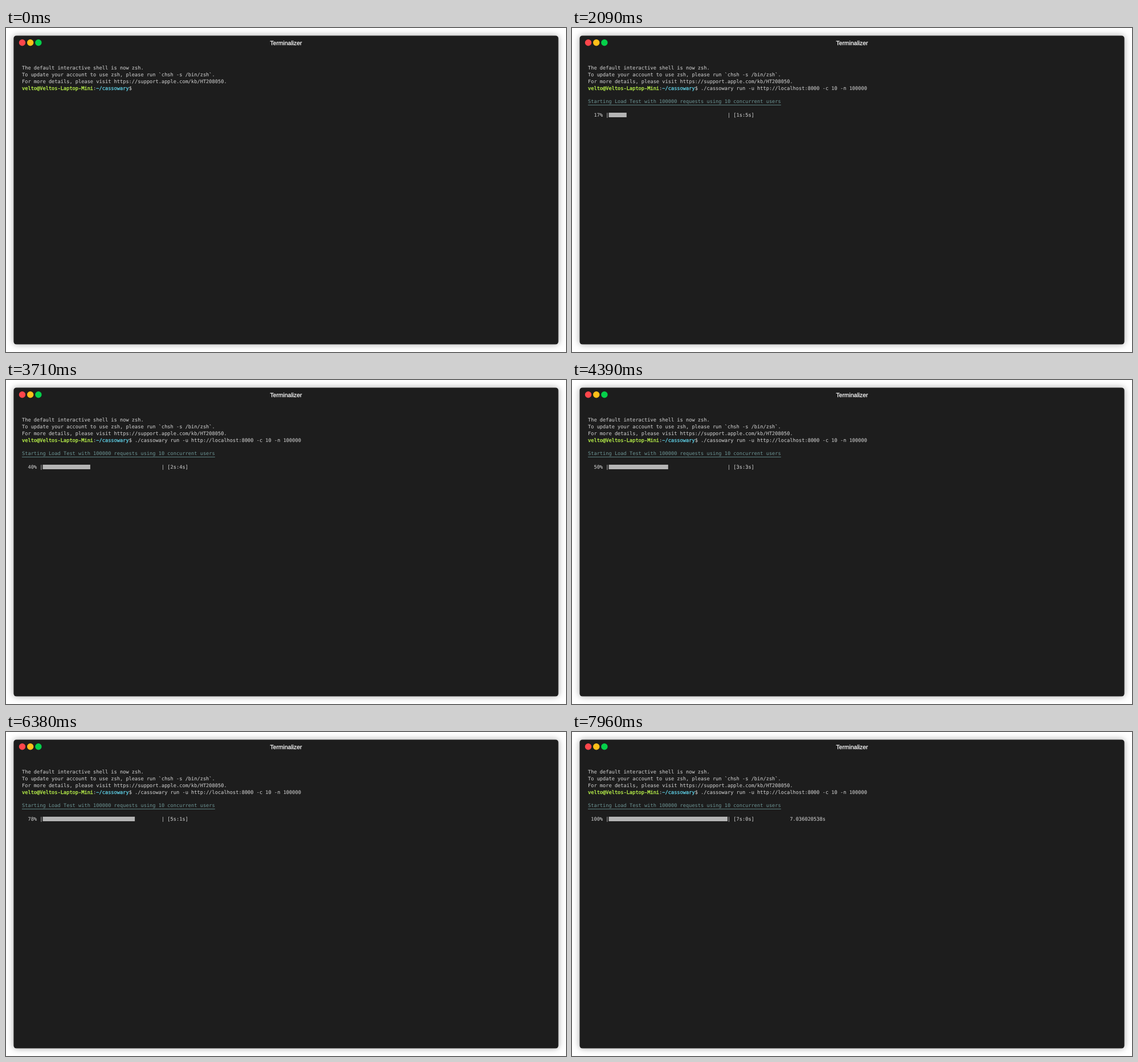
These frames come from a looping animation (983 px wide and 570 px high, 7990 ms). An HTML page:

```html
<!DOCTYPE html>
<html lang="en">
<head>
<meta charset="utf-8">
<title>Terminal load test</title>
<style>
  html, body { margin: 0; width: 100%; height: 100%; overflow: hidden; background: #fff; }
  svg { position: absolute; left: 0; top: 0; }
  .window { fill: #1d1d1d; filter: drop-shadow(0 0 6px rgba(0, 0, 0, .35)); }
  text {
    font: 8.66px "DejaVu Sans Mono", monospace; fill: #c6c6c6; stroke: #c6c6c6; stroke-width: .1px;
    white-space: pre; text-rendering: geometricPrecision;
  }
  .title { font: 10.4px "Liberation Sans", Arial, sans-serif; fill: #fff; stroke: #fff; stroke-width: .25px; text-anchor: middle; }
  .user { fill: #b9f24a; stroke: #b9f24a; stroke-width: .35px; }
  .path { fill: #5fd0e6; stroke: #5fd0e6; stroke-width: .3px; }
  .heading { fill: #6c9494; stroke: none; }
</style>
</head>
<body>
<svg width="983" height="570" viewBox="0 0 983 570">
  <rect class="window" x="13.4" y="13.4" width="956.2" height="543.2" rx="5"/>
  <circle cx="28.5" cy="25.7" r="5.7" fill="#ff464b"/>
  <circle cx="42.7" cy="25.7" r="5.7" fill="#ffbe19"/>
  <circle cx="56.9" cy="25.7" r="5.7" fill="#05d04a"/>
  <text class="title" x="491.5" y="29.7">Terminalizer</text>
  <g id="screen"></g>
</svg>
<script>
const LOOP = 7990;
const STEP = 71;
const BURSTS = [740, 1600, 2440, 3290, 4100, 4960, 5810, 6660, 7460];
const RUN_START = 800;
const RUN_TIME = 7080;
const CELL = 5.2137, LEFT = 28, BASE = 73, LINE = 11.88;
const BAR_CELLS = 40;

const screenGroup = document.getElementById('screen');

function add(tag, attrs, content = '', parent = screenGroup) {
  const node = document.createElementNS('http://www.w3.org/2000/svg', tag);
  for (const key in attrs) node.setAttribute(key, attrs[key]);
  node.textContent = content;
  return parent.appendChild(node);
}

function addLine(row, content, className = '') {
  return add('text', { x: LEFT, y: BASE + row * LINE, class: className }, content);
}

addLine(0, 'The default interactive shell is now zsh.');
addLine(1, 'To update your account to use zsh, please run `chsh -s /bin/zsh`.');
addLine(2, 'For more details, please visit https://support.apple.com/kb/HT208050.');

const prompt = addLine(3, '');
add('tspan', { class: 'user' }, 'velto@Veltos-Laptop-Mini', prompt);
add('tspan', {}, ':', prompt);
add('tspan', { class: 'path' }, '~/cassowary', prompt);
add('tspan', {}, '$ ', prompt);
const command = add('tspan', {}, '', prompt);

const headingText = 'Starting Load Test with 100000 requests using 10 concurrent users';
const heading = addLine(5, headingText, 'heading');
const underline = add('rect', {
  x: LEFT, y: 135, width: headingText.length * CELL, height: 1, fill: '#5c8080'
});
const status = addLine(7, '');
const bar = add('rect', { x: LEFT + 7 * CELL, y: 149, height: 8, fill: '#b4b4b4' });

// The screen refreshes in bursts of evenly spaced steps.
function snap(time) {
  const start = BURSTS.filter(b => b <= time).pop();
  return start === undefined ? 0 : start + Math.floor((time - start) / STEP) * STEP;
}

function statusLine(done) {
  const elapsed = done * RUN_TIME / 1000;
  // The first estimates of the remaining time run slightly high.
  const left = RUN_TIME / 1000 - elapsed + (done < 1 ? 0.7 * Math.exp(-done / 0.1) : 0);
  const percent = String(Math.floor(done * 100)).padStart(4);
  const line = `${percent}% |${' '.repeat(BAR_CELLS)}| [${Math.floor(elapsed)}s:${Math.floor(left)}s]`;
  return done < 1 ? line : line + ' '.repeat(12) + '7.036020538s';
}

function render(time) {
  const now = snap(time);
  const done = Math.min(1, (now - RUN_START) / RUN_TIME);
  command.textContent = now >= 740 ? './cassowary run -u http://localhost:8000 -c 10 -n 100000' : '';
  for (const node of [heading, underline]) {
    node.setAttribute('visibility', done >= 0 ? 'visible' : 'hidden');
  }
  status.textContent = done >= 0 ? statusLine(done) : '';
  bar.setAttribute('width', Math.max(0, Math.floor(done * BAR_CELLS)) * CELL);
}

const origin = performance.now();
function tick() {
  render((performance.now() - origin) % LOOP);
  requestAnimationFrame(tick);
}
tick();
</script>
</body>
</html>
```
